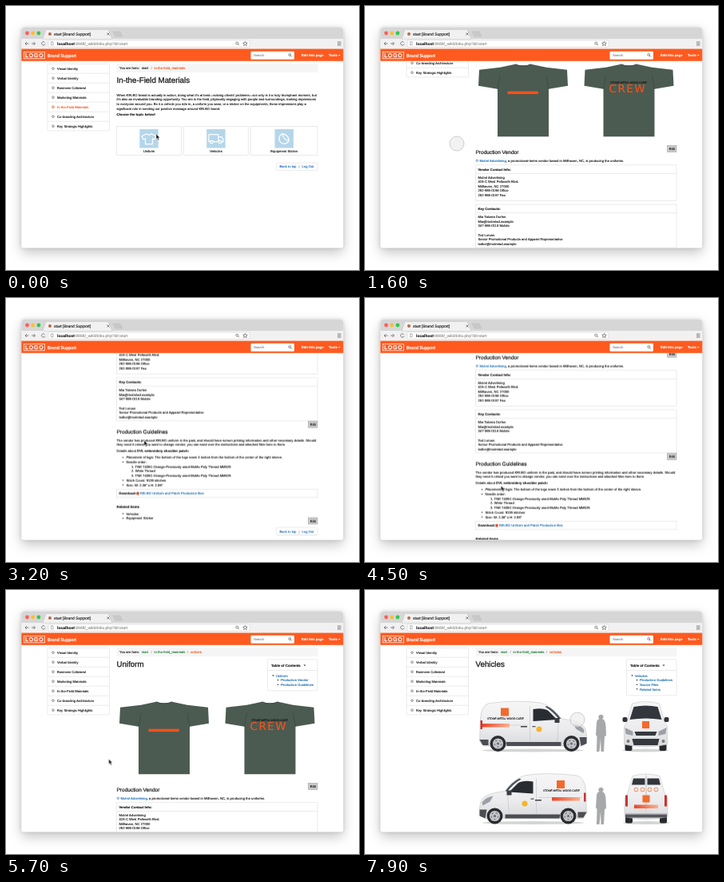
Recreate the animation shown at these times as an HTML page. Size 442 px wide and 330 px high, loop 8 s.

```html
<!DOCTYPE html>
<html lang="en">
<head>
<meta charset="utf-8">
<title>Brand Support</title>
<style>
html, body { margin: 0; width: 100%; height: 100%; overflow: hidden; background: #fff; }
svg { display: block; width: 442px; height: 330px; }
text {
  font: 4.2px "Liberation Sans", Arial, sans-serif; white-space: pre; text-rendering: geometricPrecision;
  color: #151515; fill: currentColor; stroke: currentColor; stroke-width: .12px;
}
tspan { fill: currentColor; stroke: currentColor; }
.b { font-weight: bold; }
.i { font-style: italic; }
.link { color: #1468b0; }
.green { color: #1f7a36; }
.orange { color: #ff4f14; }
.white { color: #fff; }
.dim { color: #8c8c8c; }
.mid { text-anchor: middle; }
.h1 { font-size: 9.75px; stroke-width: .25px; }
.h2 { font-size: 6.55px; stroke-width: .2px; }
.toc { font-size: 4.4px; font-weight: bold; }
.tab { font-size: 5px; }
.logo { font-size: 6.8px; letter-spacing: .95px; stroke-width: .35px; }
.brand { font-size: 5.55px; stroke-width: .25px; }
.motto { font-size: 3.4px; }
.crew { font: 13.5px "DejaVu Sans", sans-serif; letter-spacing: 1.5px; color: #f5541c; }
.window { filter: drop-shadow(0 6px 8px rgba(0, 0, 0, .2)) drop-shadow(0 0 2px rgba(0, 0, 0, .16)); }
.box { fill: #fff; stroke: #ddd; stroke-width: .6; }
.line { fill: none; stroke: #ddd; stroke-width: .6; }
.icon { fill: none; stroke: #fff; stroke-width: 1.2; stroke-linejoin: round; stroke-linecap: round; }
.tool { fill: none; stroke: #666; stroke-width: .8; }

#materials, #uniform, #vehicles, #scroller, #pointer, #arrow, #press {
  animation: 8s -10ms infinite step-end;
}
#materials { animation-name: materials; }
#uniform { animation-name: uniform; }
#vehicles { animation-name: vehicles; }
#scroller { animation-name: scroll; }
#pointer { animation-name: point; }
#arrow { animation-name: arrow; }
#press { animation-name: press; }

@keyframes materials { 0%, 82.5% { opacity: 1 } 5%, 96.25%, 100% { opacity: 0 } }
@keyframes uniform { 0%, 82.5%, 100% { opacity: 0 } 5% { opacity: 1 } }
@keyframes vehicles { 0% { opacity: 0 } 96.25%, 100% { opacity: 1 } }
@keyframes scroll {
  0% { transform: translateY(0) }
  11.25% { transform: translateY(0); animation-timing-function: steps(7) }
  20% { transform: translateY(-67px); animation-timing-function: steps(8) }
  30% { transform: translateY(-115px); animation-timing-function: steps(8) }
  40% { transform: translateY(-215.5px) }
  53.75% { transform: translateY(-215.5px); animation-timing-function: steps(8) }
  63.75% { transform: translateY(-55px); animation-timing-function: steps(5) }
  70%, 100% { transform: translateY(0) }
}
@keyframes point {
  0% { transform: translate(188px, 160px) }
  10% { transform: translate(188px, 160px); animation-timing-function: steps(5) }
  16.25% { transform: translate(115px, 172px) }
  20% { transform: translate(115px, 172px); animation-timing-function: steps(8) }
  30% { transform: translate(121px, 256px); animation-timing-function: steps(8) }
  40% { transform: translate(173px, 178px) }
  43.75% { transform: translate(173px, 178px); animation-timing-function: steps(7) }
  52.5% { transform: translate(190px, 232px) }
  53.75% { transform: translate(190px, 232px); animation-timing-function: steps(8) }
  63.75% { transform: translate(111.5px, 242.5px) }
  70% { transform: translate(111.5px, 242.5px); animation-timing-function: steps(6) }
  77.5% { transform: translate(214px, 55px); animation-timing-function: steps(2) }
  80% { transform: translate(207px, 76px) }
  88.75% { transform: translate(207px, 76px); animation-timing-function: steps(3) }
  92.5%, 100% { transform: translate(266px, 162px) }
}
@keyframes press {
  0%, 8.75%, 33.75%, 85% { opacity: 0 }
  2.5%, 16.25%, 81.25%, 95%, 100% { opacity: 1 }
}
@keyframes arrow {
  0%, 8.75%, 33.75%, 85% { opacity: 1 }
  2.5%, 16.25%, 81.25%, 95%, 100% { opacity: 0 }
}
</style>
</head>
<body>
<svg id="stage" viewBox="0 0 442 330"></svg>
<script>
const text = (x, y, s, cls = '') => `<text x="${x}" y="${y}" class="${cls}">${s}</text>`;
const rect = (x, y, w, h, attrs = 'class="box"') => `<rect x="${x}" y="${y}" width="${w}" height="${h}" ${attrs}/>`;
const path = (d, attrs) => `<path d="${d}" ${attrs}/>`;
const dot = (x, y, r, attrs = 'fill="#333"') => `<circle cx="${x}" cy="${y}" r="${r}" ${attrs}/>`;
const group = (x, y, s) => `<g transform="translate(${x} ${y})">${s}</g>`;
const lines = (x, y, step, rows) => rows.map((s, i) => s && text(x, y + i * step, s)).join('');
const bold = s => `<tspan class="b">${s}</tspan>`;

const topics = ['Visual Identity', 'Verbal Identity', 'Business Collateral', 'Marketing Materials',
  'In-the-Field Materials', 'Co-branding Architecture', 'Key Strategic Highlights'];

const sidebar = active => rect(52, 72.3, 77.5, 83.6, 'class="box" rx="1"') + topics.map((name, i) => {
  const y = 78.2 + i * 12;
  const on = i === active;
  return (i ? path(`M52 ${y - 6}h77.5`, 'class="line"') : '') +
    dot(59, y, 1.4, `fill="none" stroke="${on ? '#ff5a1f' : '#777'}" stroke-width=".7"`) +
    path(`M58 ${y}h2`, 'stroke="#888" stroke-width=".5"') +
    text(64, y + 1.5, name, on ? 'orange' : '');
}).join('');

const crumbs = leaf => rect(138.5, 72.3, 252, 10.8, 'fill="#f5f5f5" rx="1"') +
  text(142, 79.2, 'You are here:') + text(170, 79.2, 'start', leaf ? 'green' : '') + text(181.5, 79.2, '/', 'dim') +
  text(185.5, 79.2, 'in-the-field_materials', leaf ? 'green' : 'orange') +
  (leaf ? text(227, 79.2, '/', 'dim') + text(231, 79.2, leaf, 'orange') : '');

const contents = (title, items) => rect(327.5, 86.8, 62.5, 33 + (items.length - 1) * 6, 'class="box" rx="1"') +
  path('M327.5 100.5h62.5', 'class="line"') + text(332, 95.6, 'Table of Contents', 'toc') +
  path('M372.5 93.5h3l-1.5 1.7z', 'fill="#333"') +
  dot(334.5, 106.9, .8) + text(338, 108.6, title, 'link') +
  items.map((s, i) => dot(340.5, 112.6 + i * 5.6, .8) + text(344, 114.3 + i * 5.6, s, 'link')).join('');

const footer = y => rect(338.5, y, 51.5, 9.2, 'class="box" rx="1"') +
  text(342.5, y + 6.2, 'Back to top', 'link') + text(366.5, y + 6.2, '|', 'dim') + text(370.5, y + 6.2, 'Log Out', 'link');
const edit = y => rect(378.5, y, 11.5, 8, 'fill="#c8c8c8" stroke="#999" stroke-width=".5"') + text(384.3, y + 5.5, 'Edit', 'mid');
const page = (active, leaf, title) => sidebar(active) + crumbs(leaf) + text(138.5, 96, title, 'h1');

// Materials page
const tile = (x, w, name, icon) => rect(x, 150.5, w, 36) +
  rect(x + w / 2 - 11.7, 154, 23.4, 23.5, 'fill="#b5d6ea"') +
  group(x + w / 2, 165.7, icon) + text(x + w / 2, 183.2, name, 'mid');
const materials = page(4, '', 'In-the-Field Materials') + lines(138.5, 112.5, 5.75, [
  "When KELBO brand is actually in action, doing what it's at best—solving clients' problems—not only is it a truly triumphant moment, but",
  "it's also an invaluable branding opportunity. You are in the field, physically engaging with people and surroundings, making impressions",
  'to everyone around you. Be it a vehicle you ride in, a uniform you wear, or a sticker on the equipments, these impressions play a',
  'significant role in sending out positive message around KELBO brand.']) +
  text(138.5, 137.4, 'Choose the topic below!', 'b') +
  tile(138.5, 81, 'Uniform', path('M-3-6Q0-3 3-6L9-3 7 1 4.5 0V7H-4.5V0L-7 1-9-3z', 'class="icon"')) +
  tile(222.7, 80.5, 'Vehicles', path('M-9 4V-5H3V4M3-2H7L9 1V4H7M3 4H-4M-7 4h-2', 'class="icon"') +
    dot(-5.5, 4.3, 1.8, 'class="icon"') + dot(5.2, 4.3, 1.8, 'class="icon"')) +
  tile(306.5, 83.5, 'Equipment Sticker', path('M-2-6A6.4 6.4 0 1 0 6 2.5Q6-4-2-6Q-1 2 6 2.5', 'class="icon"')) +
  footer(196.2);

// Uniform page
const shirt = path('M47 0Q57 3 67 0L86 4 112 7 113 27 89 31V90.5H25V31L1 27 2 7 28 4z', 'fill="#4b5b51"') +
  path('M47 0Q57 5 67 0M25 31L28 14M89 31L86 14', 'fill="none" stroke="#3c4a42" stroke-width=".8"');
const panel = (y, h, title) => rect(138.5, y, 251.5, h) + path(`M138.5 ${y + 10.7}h251.5`, 'class="line"') + text(141.5, y + 7, title, 'b');
const thread = 'TNK 7439C-Orange-Previously used-MoMo Poly Thread MM525';
const uniform = page(-1, 'uniform', 'Uniform') +
  contents('Uniform', ['Production Vendor', 'Production Guidelines']) +
  group(141, 139.7, shirt + rect(37.5, 34, 38.5, 3.4, 'fill="#ff5018"')) +
  group(273.5, 139.7, shirt) +
  `<text x="307" y="163.8" class="motto">STONE METAL WOOD CARE</text>` +
  text(305.5, 174.7, 'CREW', 'crew') +
  text(138.5, 252, 'Production Vendor', 'h2') + edit(241.5) +
  dot(140.3, 260.3, 1.2, 'fill="none" stroke="#1f72b5" stroke-width=".7"') +
  text(143.5, 261.7, '<tspan class="link">Motrel Advertising</tspan>, a promotional-items vendor based in Millhaven, NC, is producing the uniforms.') +
  panel(265.8, 44.5, 'Vendor Contact Info:') + lines(141.5, 282.8, 5.55,
    ['Motrel Advertising', '415-C West Pellworth Blvd.', 'Millhaven, NC 27000', '252-555-0156 Office', '252-555-0157 Fax']) +
  panel(315, 54, 'Key Contacts:') + lines(141.5, 332.3, 5.55,
    ['Mia Talvera Dorlen', 'Mia@motrelad.example', '347-555-0118 Mobile', '', 'Ted Lorvan',
      'Senior Promotional Products and Apparel Representative', 'tedlor@motrelad.example']) +
  edit(369.5) + text(138.5, 384.7, 'Production Guidelines', 'h2') +
  lines(138.5, 394.8, 5.6, [
    'The vendor has produced KELBO uniform in the past, and should have screen printing information and other necessary details. Should',
    'they need it or/and you want to change vendor, you can send over the instructions and attached files here to them.']) +
  text(138.5, 408.2, 'Details about ' + bold('DVL embroidery shoulder patch:')) +
  [0, 1, 5, 6].map(i => dot(146.5, 414.8 + i * 5.7, .8)).join('') +
  text(150.5, 416.3, '<tspan class="i">Placement of logo:</tspan> The bottom of the logo sewn 3 inches from the bottom of the center of the right sleeve.') +
  text(150.5, 422, 'Needle order:') +
  lines(157, 427.7, 5.7, ['1. ' + thread, '2. White Thread', '3. ' + thread]) +
  lines(150.5, 444.8, 5.7, ['Stitch Count: 9139 stitches', 'Size: W: 2.36" x H: 2.95"']) +
  rect(138.5, 454.5, 251.5, 10.3) + text(141.5, 461.3, 'Download:', 'b') +
  rect(163.5, 458, 3, 3.5, 'fill="#d8442e"') + text(168, 461.3, 'KELBO Uniform and Patch Production files', 'link') +
  text(138.5, 478, 'Related Items', 'toc') +
  ['Vehicles', 'Equipment Sticker'].map((s, i) => dot(146.5, 485 + i * 5.7, .8) + text(150.5, 486.5 + i * 5.7, s)).join('') +
  edit(490) + footer(502.3);

// Vehicles page
const wheel = x => dot(x, 53, 10, 'fill="#2b2c30"') + dot(x, 53, 6.6, 'fill="#c3c5c9"') +
  dot(x, 53, 4.2, 'fill="none" stroke="#85878c" stroke-width="1.6" stroke-dasharray="2.2 3.1"') + dot(x, 53, 1.5, 'fill="#65676c"');
const shadow = (x, rx) => `<ellipse cx="${x}" cy="61.5" rx="${rx}" ry="2" fill="#d4d4d4"/>`;
const sideVan = shadow(67, 64) +
  path('M1 22Q2 5 12 2.5Q48-2 76 2Q88 4 103 22Q124 24 131 32Q135 39 134 52L127 56H5L0 50z', 'fill="url(#paint)" stroke="#c4c4c6" stroke-width=".6"') +
  path('M67 10Q80 8 86 12L97 23 67 25z', 'fill="#292d32"') + path('M84 6Q93 10 102 22H99Q91 12 82 7z', 'fill="#4d535a"') +
  path('M63 6V52M99 24L97 52H64M6 30H60', 'fill="none" stroke="#c2c3c7" stroke-width=".6"') +
  path('M117 28Q126 29 131 36L130 40 121 35z', 'fill="#9ba0a7"') + path('M33 51H102V56H34zM0 48H11V55H4zM125 45H134V53L127 56z', 'fill="#4c4e53"') +
  rect(1, 24, 2.5, 11, 'fill="#c33"') + rect(66, 31, 4, 1.3, 'fill="#555"') +
  path('M94 21h6v6h-6z', 'fill="#3a3d42"') + wheel(23) + wheel(115);
const badge = (x, y) => rect(x, y, 10, 10, 'fill="#f26a2e"') + text(x - 17, y + 14, 'STONE METAL WOOD CARE', 'motto');
const stripe = (x, y, w) => rect(x, y, w, 4.5, 'fill="url(#stripe)"');
const person = path('M6 0a2.7 2.7 0 0 1 2 5Q12 6 12.5 14L13 26 11 27 10 46H6.5L6 30 4.5 46H1L1.5 27 0 25 1 10Q1 6 4.5 5A2.7 2.7 0 0 1 6 0z', 'fill="#a7a8aa"');
const endVan = (glass, details) => shadow(29, 29) +
  rect(3, 48, 9, 14, 'fill="#292a2e" rx="2"') + rect(46, 48, 9, 14, 'fill="#292a2e" rx="2"') +
  path('M12 3Q29-2 46 3L52 24 56 32V54Q29 60 2 54V32L6 24z', 'fill="url(#paint)" stroke="#c4c4c6" stroke-width=".6"') +
  path(glass, 'fill="#33373d"') + details;
const front = endVan('M14 7Q29 4 44 7L49 23Q29 20 9 23z',
  rect(0, 20, 6, 6, 'fill="#303338" rx="2"') + rect(52, 20, 6, 6, 'fill="#303338" rx="2"') +
  path('M3 33L13 38V43L4 41zM55 33L45 38V43L54 41z', 'fill="#9ca1a8"') +
  path('M15 38H43L41 43H17zM12 47H46L44 55H14z', 'fill="#35383d"') +
  dot(7, 50, 2, 'fill="#777"') + dot(51, 50, 2, 'fill="#777"') +
  rect(24.5, 25, 9, 9, 'fill="#f26a2e"'));
const rear = endVan('M13 6H27.5V14H11zM30.5 6H45L47 14H30.5z',
  path('M29 2V50M3 50H55', 'stroke="#aaa" stroke-width=".7"') +
  rect(3, 27, 3, 14, 'fill="#c9342d"') + rect(52, 27, 3, 14, 'fill="#c9342d"') +
  [14, 22, 31, 39].map(x => dot(x + 2.5, 20, 2.4, 'fill="none" stroke="#f26a2e" stroke-width=".8"')).join('') +
  rect(24.5, 27, 9, 9, 'fill="#f26a2e"') + stripe(14, 39, 30) + rect(21, 45, 16, 4, 'fill="#ddd"') +
  rect(3, 51, 52, 4, 'fill="#55575c"'));
const vehicles = page(-1, 'vehicles', 'Vehicles') +
  contents('Vehicles', ['Production Guidelines', 'Source Files', 'Related Items']) +
  group(143.5, 139, sideVan) + badge(170, 147.5) + stripe(147, 167, 34) +
  dot(218, 174, 3.5, 'fill="#f5b52c"') + rect(195, 170, 8, 1.5, 'fill="#444"') +
  group(289, 156, person) + group(322.5, 139, front) +
  `<g transform="translate(277.5 229.5) scale(-1 1)">${sideVan}</g>` + badge(240, 238) + stripe(234, 259, 35) +
  dot(200, 267, 3.5, 'fill="#f5b52c"') + rect(213, 262, 8, 1.5, 'fill="#444"') +
  group(289, 247, person) + group(323, 229.5, rear);

// Browser window
const chrome = path('M19.3 54V31Q19.3 27 23 27H418.5Q422.3 27 422.3 31V54z', 'fill="#d6d6d6"') +
  rect(19.3, 41, 403, 13, 'fill="#f1f1f1"') +
  path('M46 41.3L50 29.5H128L133 41.3z', 'fill="#f1f1f1" stroke="#bbb" stroke-width=".4"') +
  path('M134 32H143L146 38H137z', 'fill="#c9c9c9" stroke="#b5b5b5" stroke-width=".4"') +
  ['#f9605a', '#fbbd3c', '#35c84b'].map((c, i) => dot(26.5 + i * 7.2, 34, 2.4, `fill="${c}"`)).join('') +
  dot(55, 35, 2, 'fill="#b86a4a"') + text(60, 36.7, 'start [Brand Support]', 'tab') +
  path('M126.5 33.5l3 3m0-3l-3 3', 'class="tool"') +
  path('M28.5 47H24m2-2-2 2 2 2M32 47h4.5m-2-2 2 2-2 2M48.5 45.5a2.2 2.2 0 1 0 .4 2', 'class="tool"') +
  rect(53, 42.7, 252, 8.6, 'fill="#fff" stroke="#ccc" stroke-width=".5" rx="1"') +
  path('M56.5 44.8h2.5v4h-2.5z', 'class="tool" opacity=".6"') +
  text(64, 48.8, bold('localhost') + '<tspan class="dim">:8888/_wiki/doku.php?id=start</tspan>', 'tab') +
  dot(289.3, 46.5, 1.5, 'class="tool"') + path('M290.4 47.6l1.6 1.6', 'class="tool"') +
  path('M299.5 44.3l.8 1.8 2 .1-1.5 1.3.5 2-1.8-1.1-1.8 1.1.5-2-1.5-1.3 2-.1z', 'class="tool" stroke-width=".5"') +
  path('M415 45h4.5m-4.5 2h4.5m-4.5 2h4.5', 'class="tool"');

const header = rect(19.3, 53.6, 403, 15.2, 'fill="#ff5a1f"') +
  rect(22.3, 57.6, 26, 8.2, 'fill="none" stroke="#fff" stroke-width=".7"') +
  text(24, 64.1, 'LOGO', 'white logo') + text(52, 63.6, 'Brand Support', 'white brand') +
  rect(306.5, 56.7, 54.5, 10, 'fill="#fff" rx="1.2"') + text(310, 63.2, 'Search', 'dim') +
  dot(355.3, 61, 1.4, 'class="tool"') + path('M356.3 62l1.6 1.6', 'class="tool"') +
  text(370, 63.2, 'Edit this page', 'white b') + text(404, 63.2, 'Tools', 'white b') +
  path('M416 61h2.6l-1.3 1.6z', 'fill="#fff"');

document.getElementById('stage').innerHTML = `
  <defs>
    <clipPath id="view"><rect x="19" y="68.8" width="403.3" height="233.2"/></clipPath>
    <linearGradient id="paint" x2="0" y2="1"><stop stop-color="#f6f6f7"/><stop offset=".6" stop-color="#ececee"/><stop offset="1" stop-color="#d8d9dc"/></linearGradient>
    <linearGradient id="stripe"><stop stop-color="#e9472a"/><stop offset="1" stop-color="#f9b28c"/></linearGradient>
  </defs>
  ${rect(19.3, 27, 403, 275.5, 'class="window" fill="#fff" rx="3"')}
  <g clip-path="url(#view)">
    <g id="materials">${materials}</g>
    <g id="uniform"><g id="scroller">${uniform}</g></g>
    <g id="vehicles">${vehicles}</g>
  </g>
  ${chrome}${header}
  <g id="pointer">
    <g id="arrow">${path('M0 0V6.5L1.5 5.2 2.6 7.7 3.8 7.2 2.7 4.8H4.7z', 'fill="#111" stroke="#fff" stroke-width=".5"')}</g>
    <g id="press">${dot(0, 0, 9, 'fill="#eee" fill-opacity=".75" stroke="#bbb" stroke-width=".7"')}</g>
  </g>`;
</script>
</body>
</html>
```
